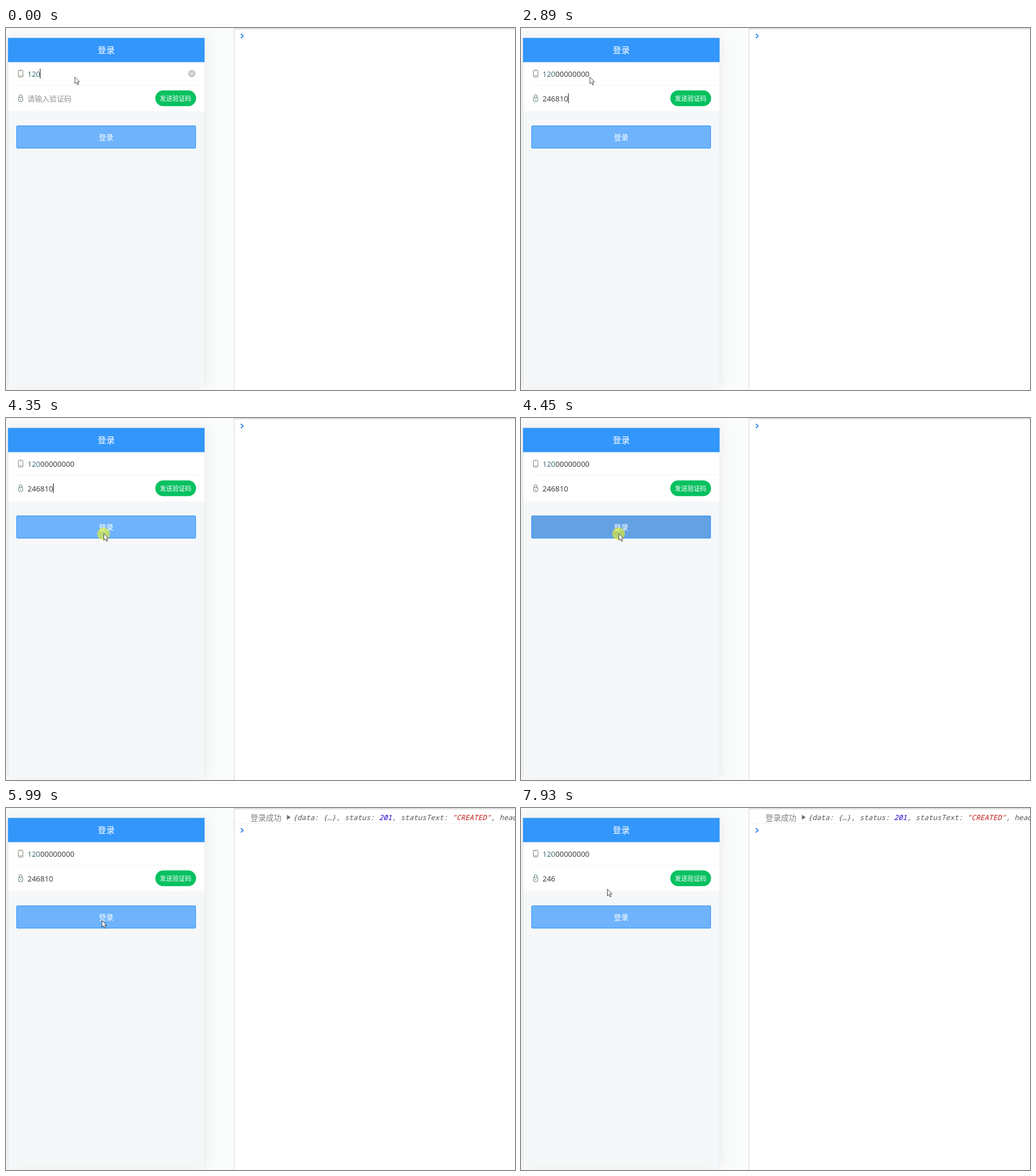
Animation, 887 px wide and 631 px high, one loop 8 s. Source, as an HTML page:

```html
<!DOCTYPE html>
<html lang="zh">
<head>
<meta charset="utf-8">
<title>登录</title>
<style>
  html, body { margin: 0; width: 100%; height: 100%; overflow: hidden; background: #fafbfb; }
  svg { display: block; width: 887px; height: 631px; }
  text { font-family: "Noto Sans CJK SC", "Noto Sans CJK", "Noto Sans", sans-serif; white-space: pre; }
  .num { font: 13px "Open Sans", "Noto Sans", sans-serif; fill: #323233; }
  .mid { text-anchor: middle; fill: #fff; }
  .log { font: italic 12.5px "Noto Sans Mono", "DejaVu Sans Mono", monospace; fill: #565656; }
  .line { fill: none; stroke-width: 1; }
  .card { filter: drop-shadow(0 0 11px rgba(0, 0, 0, .07)); }
</style>
</head>
<body>
<svg viewBox="0 0 887 631">
  <rect width="887" height="631" fill="#fafbfb"/>
  <rect class="card" x="3" y="17" width="343.5" height="609" fill="#dde3e7"/>
  <rect x="4" y="17" width="342" height="609" fill="#f5f7f9"/>
  <rect x="4" y="60" width="342" height="85" fill="#fff"/>
  <rect x="18" y="99" width="328" height="1" fill="#f4f5f7"/>
  <rect x="3.5" y="17.3" width="342.5" height="42.2" fill="#3296fa"/>
  <text class="mid" x="174.7" y="44.3" font-size="15">登录</text>

  <g class="line" stroke="#85857a">
    <rect x="21.5" y="73.5" width="8" height="12" rx="1"/>
    <path d="M21.5 83.2h8M24.5 74.8h2" stroke-width=".8"/>
  </g>
  <g class="line" stroke="#55776a">
    <circle cx="25.5" cy="124.7" r="4"/>
    <path d="M22.9 121.6v-2.6a2.6 2.6 0 0 1 5.2 0v2.6M25.5 123.8v2.2"/>
  </g>

  <text class="num" x="37.5" y="84.5"><tspan id="head" fill="#38696d"></tspan><tspan id="tail"></tspan></text>
  <text class="num" id="code" x="37.5" y="127.7"></text>
  <text id="hint" x="37.2" y="127.9" font-size="12.8" fill="#8f918f">请输入验证码</text>
  <g id="clear">
    <circle cx="323.8" cy="79.5" r="6.5" fill="#c8c9cc"/>
    <path d="M321.4 77.1l4.8 4.8m0-4.8l-4.8 4.8" class="line" stroke="#fff"/>
  </g>

  <rect x="260.2" y="108.8" width="71" height="27.4" rx="13.7" fill="#07c160"/>
  <text class="mid" x="295.6" y="126.6" font-size="11">发送验证码</text>

  <rect id="button" x="18.5" y="170.5" width="312" height="39" rx="1.5" stroke="#3296fa"/>
  <text class="mid" x="174.6" y="195" font-size="12.8">登录</text>

  <rect id="caret" width="1" height="17" fill="#222"/>

  <rect x="397" width="490" height="631" fill="#fff"/>
  <rect x="397" width="1" height="631" fill="#d3d8dc"/>
  <rect x="397" width="490" height="1" fill="#f3f3f3"/>
  <rect x="397" y="1" width="490" height="1" fill="#c6c8ca"/>
  <g id="result">
    <text x="426" y="21.5" font-size="13.5" fill="#808080">登录成功</text>
    <path d="M489.5 12v8.6l6.6-4.3z" fill="#6e6e6e"/>
    <text class="log" x="500" y="20.6">{data: {…}, status: <tspan fill="#1c00cf">201</tspan>, statusText: <tspan fill="#c41a16">"CREATED"</tspan>, headers: {…}</text>
    <rect x="398" y="27" width="489" height="1" fill="#f0f0f0"/>
  </g>
  <path id="prompt" class="line" d="M409.2 10.3l4 3.7-4 3.7" stroke="#3b8bea" style="stroke-width:1.9"/>

  <circle id="halo" r="11" fill="#ff0" opacity=".53"/>
  <path id="mouse" d="M.5.5v11.7l2.7-2.5 2.1 4.4 1.9-.9-2.1-4.3h3.6z" fill="#fff" stroke="#333" stroke-width=".9" stroke-linejoin="round"/>
</svg>
<script>
const LOOP = 8000, BLINK = 500, STEP = 77, DIGIT = 7.44;
const PHONE = '12000000000', CODE = '246810';
const $ = id => document.getElementById(id);

// The pointer travels to each stop in a few visible steps.
const home = { x: 119.5, y: 85 };
const stops = [
  { start: 3370, steps: 8, x: 182, y: 208 },
  { start: 4120, steps: 3, x: 170, y: 201 },
  { start: 5990, steps: 6, x: 125.5, y: 126.5 },
  { start: 6690, steps: 2, x: 135, y: 136 },
  { start: 7930, steps: 1, x: 150, y: 141 },
];

const clamp = (v, lo, hi) => Math.min(hi, Math.max(lo, v));
const within = (t, from, to) => t >= from && t < to;
const ease = p => p * p * (3 - 2 * p);
const show = (id, on) => { $(id).style.display = on ? '' : 'none'; };
const move = (id, x, y) => $(id).setAttribute('transform', `translate(${x} ${y})`);

// Evenly spaced key presses: how many of n have happened by time t.
const presses = (t, first, last, n) =>
  clamp(Math.floor((t - first) / (last - first) * (n - 1)) + 1, 0, n);

function pointer(t) {
  let { x, y } = home;
  for (const stop of stops) {
    const done = Math.floor((t - stop.start) / STEP) + 1;
    const p = ease(clamp(done / stop.steps, 0, 1));
    x += (stop.x - x) * p;
    y += (stop.y - y) * p;
  }
  return { x, y };
}

function caretOn(t) {
  if (t < 2890) return true;
  if (t < 4450) return Math.floor((t - 2890) / BLINK) % 2 === 0;
  return within(t, 6530, 7620);
}

function draw(t) {
  const onPhone = t < 1500, logged = t >= 4980;
  const phone = 3 + presses(t, 70, 1270, 8);
  const code = presses(t, 1970, 2890, 6) - presses(t, 6990, 7310, 3);
  const { x, y } = pointer(t);

  $('head').textContent = PHONE.slice(0, 3);
  $('tail').textContent = PHONE.slice(3, phone);
  $('code').textContent = CODE.slice(0, code);
  show('hint', code === 0);
  show('clear', onPhone);

  show('caret', caretOn(t));
  move('caret', Math.floor(37.5 + DIGIT * (onPhone ? phone : code)), onPhone ? 71 : 114);

  $('button').setAttribute('fill', within(t, 4450, 4580) ? '#63a1e3' : '#6eb3fc');
  show('result', logged);
  move('prompt', 0, logged ? 25 : 0);

  show('halo', within(t, 4350, 4580) || within(t, 6380, 6530));
  move('halo', x, y + 1);
  move('mouse', x, y);
}

const start = performance.now();
function tick() {
  draw((performance.now() - start) % LOOP);
  requestAnimationFrame(tick);
}
tick();
</script>
</body>
</html>
```
